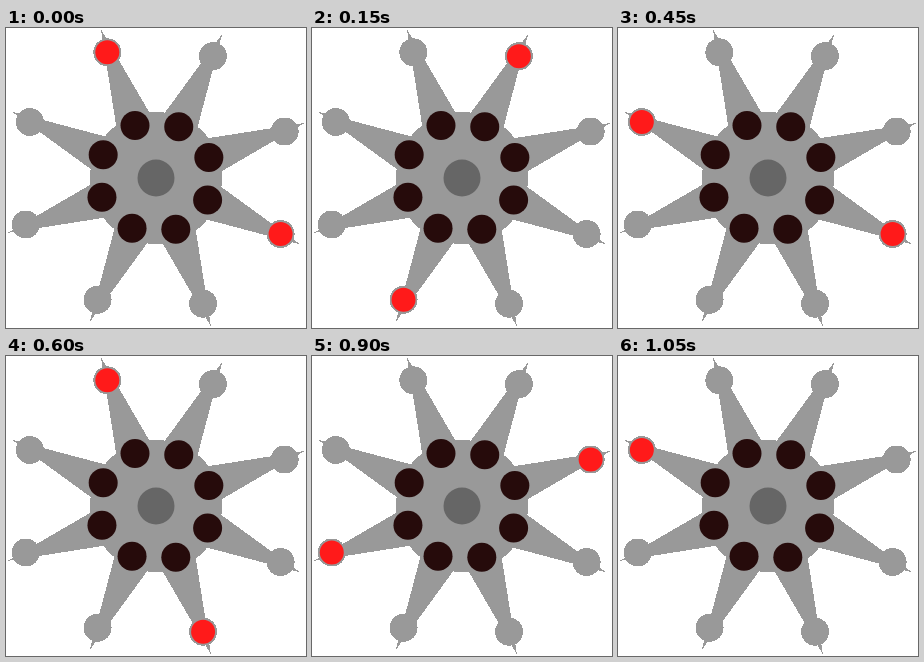
These frames come from a looping animation (300x300 px, 1.2 s). An HTML page:

```html
<!DOCTYPE html>
<html>
<head>
<meta charset="utf-8">
<style>
  html, body { margin: 0; width: 100%; height: 100%; overflow: hidden; background: #fff; }
  svg { display: block; width: 100vw; height: 100vh; }
</style>
</head>
<body>
<svg viewBox="0 0 300 300">
  <g id="body" fill="#999" shape-rendering="crispEdges">
    <circle cx="150" cy="150" r="66"/>
  </g>
  <circle cx="150" cy="150" r="18.5" fill="#666"/>
  <g id="holes" fill="#260b0b"></g>
  <g id="lights" fill="#ff1a1a"></g>
</svg>
<script>
const STEP = 150;
const ARMS = 8;
const TILT = -110.3;

// Arms lit at each step, counted clockwise from the upper left
const lit = ["03", "15", "26", "37", "04", "15", "26", "7"];

function add(parent, tag, attributes) {
  const node = document.createElementNS("http://www.w3.org/2000/svg", tag);
  for (const key in attributes) node.setAttribute(key, attributes[key]);
  return document.getElementById(parent).appendChild(node);
}

// A disc on an elliptical ring around (x, y)
function discOnRing(parent, degrees, x, y, rx, ry, r) {
  const angle = degrees * Math.PI / 180;
  return add(parent, "circle", { cx: x + rx * Math.cos(angle), cy: y + ry * Math.sin(angle), r });
}

const lights = [];
for (let i = 0; i < ARMS; i++) {
  const angle = TILT + i * 360 / ARMS;
  add("body", "path", {
    d: "M158.5 0L55 -20.8V18Z",
    transform: `translate(150 150) rotate(${angle})`
  });
  discOnRing("body", angle, 149.2, 150, 138, 134, 14);
  discOnRing("holes", angle - 0.6, 149.4, 149.4, 57.2, 55.6, 14.5);
  lights.push(discOnRing("lights", angle, 149.2, 150, 138, 134, 12));
}

function draw() {
  const current = lit[Math.floor(performance.now() / STEP) % lit.length];
  lights.forEach((light, i) =>
    light.setAttribute("visibility", current.includes(i) ? "visible" : "hidden"));
  requestAnimationFrame(draw);
}
draw();
</script>
</body>
</html>
```
